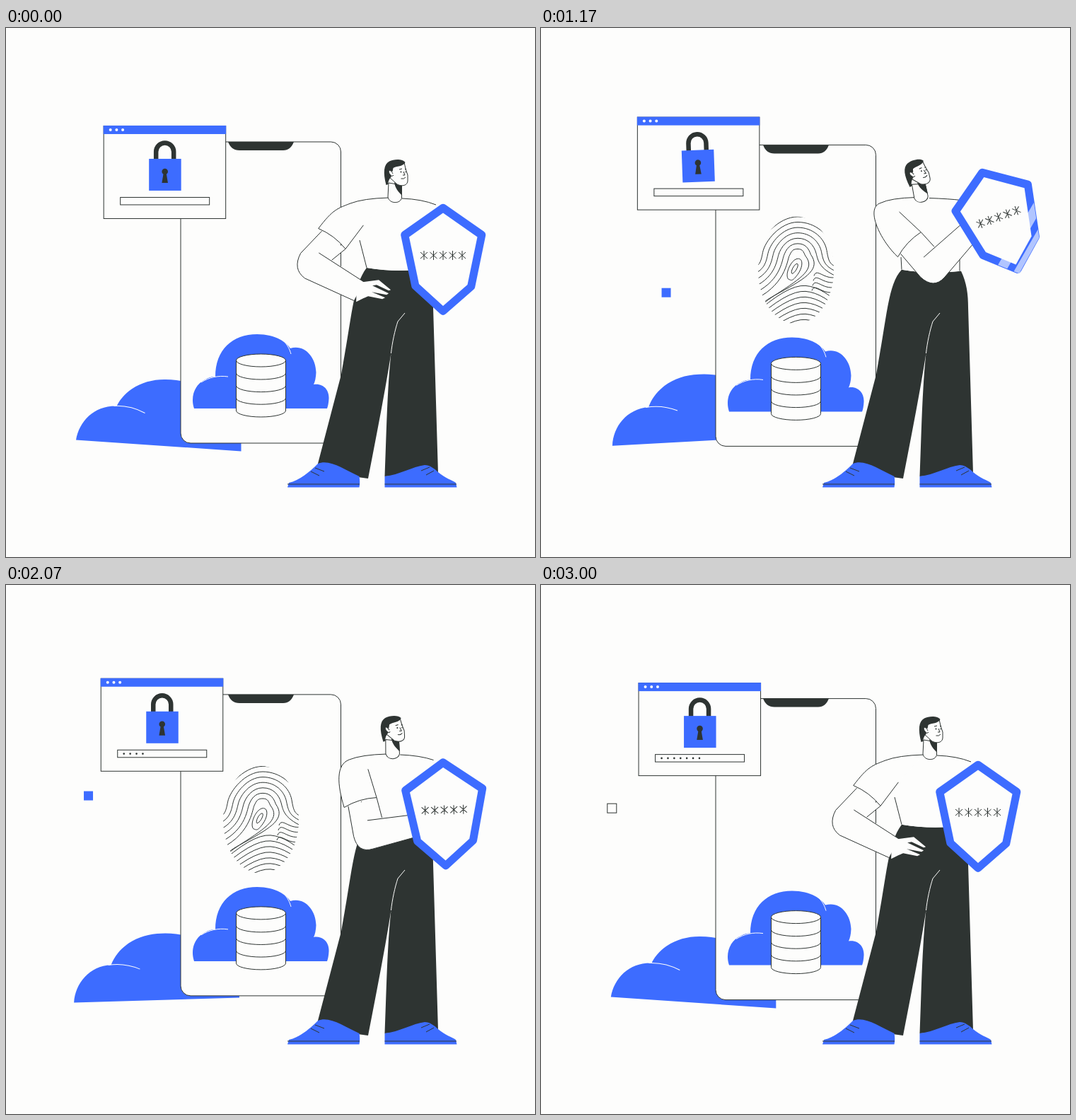
An HTML page for the animation above (3030 ms loop, 748 by 748 pixels).

```html
<!DOCTYPE html>
<html lang="en">
<head>
<meta charset="utf-8">
<title>Data protection</title>
<style>
  html, body { margin: 0; width: 100%; height: 100%; overflow: hidden; background: #fdfdfc; }
  svg { display: block; width: 100vw; height: 100vh; }
  .blue { fill: #3d6cff; }
  .dark { fill: #2e3432; }
  .white { fill: #fdfdfc; }
  .line { fill: none; stroke: #2e3432; }
  .box { fill: #fdfdfc; stroke: #2e3432; }
  .light { fill: none; stroke: #fdfdfc; }
</style>
</head>
<body>
<svg viewBox="0 0 748 748">
  <defs>
    <clipPath id="shieldClip"><path d="M0-79 60-38 44 41 0 79-44 39-60-38Z"/></clipPath>
    <clipPath id="printClip"><ellipse cx="360.500" cy="338" rx="53.500" ry="76"/></clipPath>
  </defs>

  <g id="hill">
    <path class="blue" d="M98.500 582C103 555 125 533 156 534C168 510 195 496 225 496.500C270 497 310 520 332 560V598Z"/>
    <path class="light" d="M152 534C170 533 183 537 196 544"/>
  </g>

  <g id="phone">
    <rect class="box" x="247" y="161" width="226.500" height="426" rx="14"/>
    <path class="dark" d="M314 161H407C404 169 399 173 392 173H330C322 173 317 169 314 161Z"/>
    <g clip-path="url(#printClip)"><g id="print" class="line"></g></g>
    <path class="blue" d="M266 538C260 520 268 503 282 497Q288 493 296 493C296 455 320 433 355 433C382 433 397 445 402 453C422 447 438 465 438.500 487Q438 498 435 504C448 502 457 511 456.500 524Q456 533 454 538Z"/>
    <path class="light" d="M276 501C287 494 300 491 314 493M392 442C398 448 401 454 403 461"/>
    <path class="box" d="M325.500 470V541A35 9 0 0 0 395.500 541V470"/>
    <path id="discs" class="line"/>
    <ellipse class="box" cx="360.500" cy="470" rx="35" ry="9"/>
  </g>

  <g id="window">
    <rect class="box" width="172.500" height="131"/>
    <rect class="blue" x="-.5" y="-.5" width="173.500" height="12"/>
    <g id="buttons" class="white"></g>
    <g id="lock">
      <path id="shackle" fill="none" stroke="#2e3432" stroke-width="6.500" d="M-12.500-20V-32.500A12.500 12.500 0 0 1 12.500-32.500V-20"/>
      <rect class="blue" x="-22.500" y="-22.500" width="45.500" height="45"/>
      <path class="dark" d="M-2-2H2L4.300 11.500H-4.300Z"/>
      <circle class="dark" cy="-4.500" r="4.300"/>
    </g>
    <rect class="box" x="23.500" y="101" width="126" height="10.500"/>
    <g id="dots" class="dark"></g>
  </g>

  <g id="squares"></g>

  <path id="pants" class="dark"/>
  <path class="light" d="M544.500 460C546 445 550 427 554 415L564 403"/>
  <path class="blue" d="M398 649.500L400 643C415 640 430 627 441 616C457 609 478 624 499.500 634Q501 642 499.500 649.500ZM535.500 649.500V634C556 632 575 620 592 618C599 618 606 623 611 628C620 636 632 640 636 643L637.500 649.500Z"/>
  <path class="line" d="M398 645H500M535.500 645H637M437 622L450 627M431 627L443 633M599 621L587 626M605 626L594 632"/>

  <path id="body" class="white"/>
  <path id="bodyLine" class="line"/>
  <path id="arm" class="white"/>
  <path id="armLine" class="line"/>
  <path id="sleeve" class="box"/>
  <path id="hand" class="white" d="M-3-12L28-16L45-2L42-1L25-9L19-8L42 3L39 5L18 1L37 9L33 11L13 7L6 10L-4 15Z"/>

  <g id="head">
    <path class="box" d="M541 219L540 239C542 249 558 249 559.500 240V222Z"/>
    <path class="dark" d="M549 218L554 222L560 222.500V237C555 232 550 226 549 218Z"/>
    <path class="box" d="M563 190L565 199L568 208V216C568 222 561 225 553 221L541 210L545 194Z"/>
    <path class="dark" d="M537.500 222C533 204 534 193 542 188.500C549 185 561 185 564.500 190C562 196 552 195 547.500 198L546.500 203L542 202L545 210C542 213 540 217 540.500 221Z"/>
    <path class="box" d="M547 206C543 198 539 202 543 207Q546 211 548 208"/>
    <path class="line" d="M556 200l4-1M564 200l2-1M558.500 213Q563 214 565 211M562 203l2 5h-3"/>
    <g class="dark"><circle cx="558.500" cy="203.500" r="1"/><circle cx="565" cy="203.500" r=".8"/></g>
  </g>

  <g id="shield">
    <path class="blue" stroke="#3d6cff" stroke-width="11.500" stroke-linejoin="round" d="M0-73 54.500-35 39.500 38 0 72.500-39 37-54-35Z"/>
    <g clip-path="url(#shieldClip)"><g id="glare" fill="#b1c5ff">
      <rect x="28" y="-120" width="14" height="240"/><rect x="52" y="-120" width="60" height="240"/>
    </g></g>
    <path class="white" d="M0-66 48.500-32 34.500 35.500 0 65.500-34 34.500-48-32Z"/>
    <path id="stars" class="line"/>
  </g>
</svg>

<script>
const LOOP = 3030;
const $ = id => document.getElementById(id);
const clamp = (v, lo = 0, hi = 1) => Math.min(hi, Math.max(lo, v));
const mix = (a, b, u) => a + (b - a) * u;
const repeat = (n, make) => Array.from({ length: n }, (_, i) => make(i)).join('');
const setPath = (id, d) => $(id).setAttribute('d', d);
const place = (id, x, y, angle = 0, extra = '') =>
  $(id).setAttribute('transform', `translate(${x} ${y}) rotate(${angle}) ${extra}`);

// The whole person follows five values: turn of the body, angles of upper arm
// and forearm, lift and tilt of the shield.
const rest = { turn: 0, upper: 127, fore: 29, lift: 0, tilt: 0 };
const poses = [
  { at: 60, ...rest },
  { at: 430, turn: -.3, upper: 100, fore: 20, lift: -.09, tilt: 15 },
  { at: 1050, turn: 1, upper: 43, fore: -45, lift: 1, tilt: -22 },
  { at: 1580, turn: 1, upper: 43, fore: -45, lift: 1, tilt: -5.5 },
  { at: 2070, turn: .25, upper: 73, fore: -11, lift: .06, tilt: -1.5 },
  { at: 2430, ...rest }
];

// Smooth interpolation that passes through the poses without overshoot.
function poseAt(t) {
  const last = poses.length - 1;
  if (t <= poses[0].at || t >= poses[last].at) return rest;
  const k = poses.findIndex(p => p.at > t) - 1;
  const rate = (i, key) => (poses[i + 1][key] - poses[i][key]) / (poses[i + 1].at - poses[i].at);
  const slope = (i, key) => {
    if (i === 0 || i === last) return 0;
    const a = rate(i - 1, key), b = rate(i, key);
    return a * b > 0 ? 2 * a * b / (a + b) : 0;
  };
  const from = poses[k], to = poses[k + 1], span = to.at - from.at, u = (t - from.at) / span;
  const value = key => mix(from[key], to[key], u * u * (3 - 2 * u)) +
    span * u * (1 - u) * (slope(k, key) * (1 - u) - slope(k + 1, key) * u);
  return Object.fromEntries(Object.keys(rest).map(key => [key, value(key)]));
}

// A point moved along a direction and sideways from it.
function shift([x, y], degrees, along, side = 0) {
  const a = degrees * Math.PI / 180, c = Math.cos(a), s = Math.sin(a);
  return [x + along * c - side * s, y + along * s + side * c];
}

function drawPerson(t, bob) {
  const { turn, upper, fore, lift, tilt } = poseAt(t);
  const crouch = Math.max(0, bob) * .8;
  const neck = [550 - 11 * turn, 245 + crouch - 4 * turn];
  const nearNeck = (x, y) => [neck[0] + x, neck[1] + y];
  const waist = 339 + bob * .6;

  const shoulder = [488, 262 + crouch + 10 * turn];
  const hem = shift(shoulder, upper, 45);
  const hemOut = shift(hem, upper, 0, 24), hemIn = shift(hem, upper, 0, -24);
  const elbow = shift(shoulder, upper, 92);
  const wrist = shift(elbow, fore, 76);
  const wristTop = shift(wrist, fore, 0, -15), crease = shift(elbow, fore, 0, -20);

  setPath('pants', `M510 ${waist}Q550 ${waist + 7} 594 ${waist + 2}C602 360 604 377 604 395L611 630L535.500 634` +
    `C538 570 539 510 544.500 460C535 520 523 580 512 637L490 634L441 616L474 490C483 440 487 410 491 390S500 352 510 ${waist}Z`);

  const side = [500 + 9 * turn, 300 + 24 * turn];
  const collar = `M${nearNeck(-9, -5)}Q${nearNeck(-45, -4)} ${nearNeck(-63 + 4 * turn, 3)}`;
  const rightEdge = [608 - 14 * turn, neck[1] + 5 - 6 * turn];
  setPath('body', `${collar}L${side}L510 ${waist}Q550 ${waist + 7} 592 ${waist + 2}L${rightEdge}Q${nearNeck(38, -3)} ${nearNeck(10, -4)}Z`);
  setPath('bodyLine', `M${side}L510 ${waist}M592 290V${waist + 2}M${nearNeck(10, -4)}Q${nearNeck(38, -3)} ${rightEdge}`);

  const tip = shift(shift(elbow, upper, 0, 22), fore, 0, 21);
  const outer = `M${shift(hem, upper, 0, 18)}L${shift(elbow, upper, -4, 23)}Q${tip} ${shift(elbow, fore, 0, 21)}L${shift(wrist, fore, 0, 15)}`;
  const bend = shift(crease, fore, 21);
  setPath('arm', `${outer}L${wristTop}L${bend}L${hemIn}Z`);
  setPath('armLine', `${outer}M${crease}L${wristTop}M${hemIn}L${bend}`);
  setPath('sleeve', `${collar}C${nearNeck(-81, 10)} ${shift(hemOut, upper, -34)} ${hemOut}` +
    `Q${shift(hem, upper, -6)} ${hemIn}L${shift(hemIn, upper, -42)}`);

  place('hand', ...wrist, 2 * tilt);
  place('head', ...neck, -13 * turn, 'translate(-550 -245)');
  place('shield', 618 + 31 * lift, 327.5 - 58 * lift + crouch, tilt);
  place('glare', 0, 0, 50, `translate(${(t - 1170) * .45} 0)`);
}

// Families of arches, crests and ripples, cut to an oval.
function ridges() {
  const paths = [];
  for (let k = 0; k < 7; k++) {
    const half = 58 - 7.5 * k, top = 262.5 + 7.6 * k, l = 361 - half, r = 361 + half;
    const right = k < 5
      ? `S${r + 4} ${325 + 3 * k} 425 ${322 + 7 * k}`
      : `C${r + 14} 336 ${r - 4} 348 ${357 - 4 * k} ${360 + 2 * k}S330 ${375 + k} 300 ${364 + 6 * k}`;
    paths.push(`M296 ${328 + 9 * k}C${l - 2} ${326 + 6 * k} ${l} ${330 - k} ${l + 3} ${312 + k}` +
      `S${l + half * .55} ${top} 363 ${top}S${r - 3} ${top + half * .35} ${r} ${306 + 2 * k}${right}`);
  }
  paths.push('M350 351C344 345 353 324 362 322S371 333 363 344S354 352 350 351',
    'M355 343C352 341 358 329 362 329S360 342 355 343');
  for (let j = 0; j < 9; j++)
    paths.push(`M298 ${404 + 8 * j}Q348 ${358 + 8 * j} 374 ${360 + 8 * j}T430 ${394 + 8 * j}`);
  for (let j = 0; j < 4; j++)
    paths.push(`M${386 - j} ${346 + 7 * j}c4-12 14 6 32 2`);
  return paths;
}

// Each square drifts in a straight line and turns hollow before it goes.
const squares = [
  { on: 200, off: 900, hollow: 800, from: [323, 134], to: [323, 112] },
  { on: 1000, off: 1650, hollow: 1430, from: [186, 370], to: [152, 386] },
  { on: 1700, off: 3018, hollow: 2800, from: [123, 291], to: [100, 316] },
  { on: 2250, off: 2750, hollow: 2660, from: [509.5, 112], to: [509.5, 161] }
];

function drawSquare(rect, { on, off, hollow, from, to }, t) {
  const u = (t - on) / (off - on);
  rect.setAttribute('visibility', u >= 0 && u < 1 ? 'visible' : 'hidden');
  rect.setAttribute('class', t < hollow ? 'blue' : 'box');
  rect.setAttribute('transform', `translate(${from.map((v, d) => mix(v, to[d], u))})`);
}

function drawPrint(t) {
  const end = clamp((t - 100) / 730), start = clamp((t - 2250) / 600);
  const print = $('print');
  print.setAttribute('visibility', end > start ? 'visible' : 'hidden');
  print.setAttribute('stroke-dasharray', `${Math.max(0, end - start)} 2`);
  print.setAttribute('stroke-dashoffset', -start);
}

function drawWindow(t, phase) {
  place('window', 136.5 + 2.4 * Math.cos(phase - .8), 132.4 + 6.6 * Math.cos(phase + .4));
  const u = clamp((t - 120) / 1240);
  const tilt = 9.2 * Math.exp(-1.55 * u) * Math.sin(2 * Math.PI * u);
  const lift = Math.max(0, tilt) * .6;
  place('lock', 86.5, 91.5, tilt, 'translate(0 -22.5)');
  place('shackle', lift / 2, -lift);

  const typed = (t < 1100 ? t - 80 : t - 1620) / 110;
  [...$('dots').children].forEach((dot, i) => dot.setAttribute('opacity', typed >= i + 1 ? 1 : 0));
}

function draw(t) {
  const phase = 2 * Math.PI * t / LOOP, wave = Math.sin(phase), bob = 6.7 * wave;
  place('hill', 171 + 3 * wave, 587.5 - wave, 4 * Math.cos(phase) - 4, 'translate(-170.5 -587)');
  place('phone', 0, bob);
  drawPrint(t);
  drawWindow(t, phase);
  squares.forEach((square, i) => drawSquare($('squares').children[i], square, t));
  drawPerson(t, bob);
}

$('print').innerHTML = ridges().map(d => `<path pathLength="1" d="${d}"/>`).join('');
$('buttons').innerHTML = repeat(3, i => `<circle cx="${9.5 + 8.7 * i}" cy="5.5" r="2"/>`);
$('dots').innerHTML = repeat(7, i => `<circle cx="${32.5 + 8.9 * i}" cy="106.3" r="1.3"/>`);
$('squares').innerHTML = repeat(squares.length, () => '<rect x="-6.5" y="-6.5" width="13" height="13"/>');
setPath('discs', repeat(3, i => `M325.5 ${488 + 17.6 * i}a35 9 0 0 0 70 0`));
setPath('stars', repeat(5, i => `M${13.5 * i - 27}-12.5v13m-5-11l10 9m0-9l-10 9`));

function frame() {
  draw(performance.now() % LOOP);
  requestAnimationFrame(frame);
}
frame();
</script>
</body>
</html>
```
